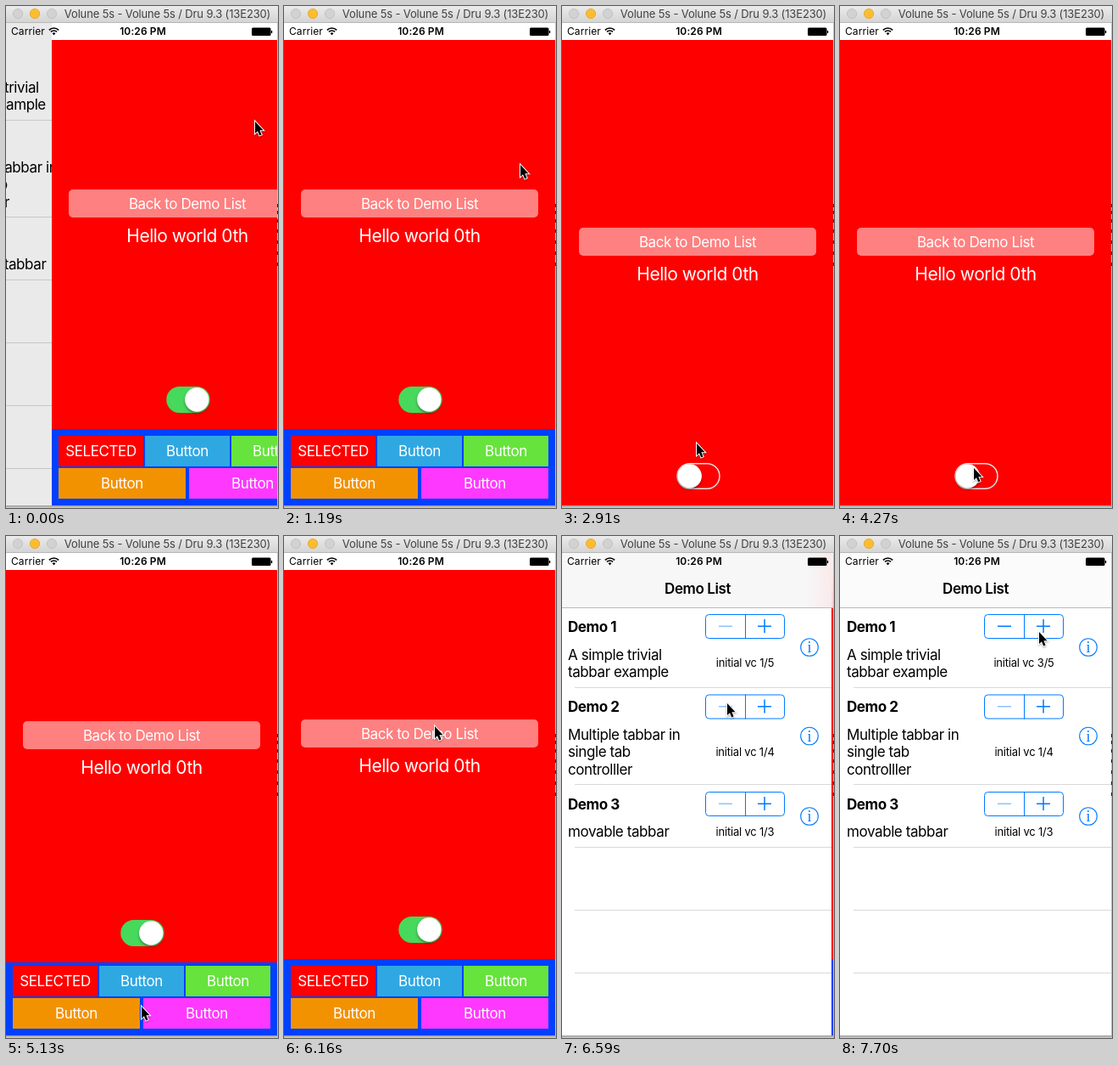
Recreate the animation shown at these times as an HTML page with a canvas. Size 321 by 591 pixels, loop 8 s.

```html
<!DOCTYPE html>
<html lang="en">
<head>
<meta charset="utf-8">
<title>Tab bar demo</title>
<style>
html, body { margin: 0; width: 100%; height: 100%; overflow: hidden; background: #fff; }
canvas { display: block; }
</style>
</head>
<body>
<canvas id="stage" width="321" height="591"></canvas>
<script>
const ctx = document.getElementById('stage').getContext('2d');
const LOOP = 8000, W = 320, BLUE = '#007aff';

const STEP = 60;
const ANCHORS = [[0, 0], [700, 1190], [2100, 2430], [3500, 4270], [4600, 5130], [5600, 6300], [6960, 7700]];

const CURSOR = [
  [1130, 293, 135], [1190, 278, 186], [1420, 205, 320], [1640, 127, 440], [1930, 162, 459],
  [2600, 162, 459], [3020, 156, 533], [3080, 157, 536], [4210, 157, 536], [4270, 157, 543],
  [4380, 159, 553], [5200, 159, 553], [5330, 176, 213], [5620, 176, 213], [5680, 177, 223],
  [6380, 177, 223], [6930, 234, 131], [7170, 234, 112]
];

const ROWS = [
  { y: 84, info: 131, stepper: 92, value: 149, lines: ['A simple trivial', 'tabbar example'] },
  { y: 178, info: 235.5, stepper: 186.5, value: 254, lines: ['Multiple tabbar in', 'single tab', 'controlller'] },
  { y: 292, info: 330, stepper: 301, value: 348.5, lines: ['movable tabbar'] }
];

const clamp = v => Math.min(1, Math.max(0, v));
const mix = (a, b, k) => a + (b - a) * k;
const easeOut = k => 1 - (1 - clamp(k)) ** 2;

// Critically damped spring used by the page transitions
function spring(ms) {
  const x = Math.max(0, ms) * 0.0175;
  return 1 - (1 + x) * Math.exp(-x);
}

// cubic-bezier(.42, 0, .58, 1)
function easeInOut(k) {
  k = clamp(k);
  let lo = 0, hi = 1;
  for (let i = 0; i < 20; i++) {
    const s = (lo + hi) / 2, r = 1 - s;
    if (1.26 * r * r * s + 1.74 * r * s * s + s ** 3 < k) lo = s; else hi = s;
  }
  return lo * lo * (3 - 2 * lo);
}

function held(t) {
  const anchor = ANCHORS.filter(a => t >= a[0]).pop()[1];
  return anchor + Math.floor((t - anchor + 2) / STEP) * STEP;
}

function rect(x, y, w, h, color) {
  ctx.fillStyle = color;
  ctx.fillRect(x, y, w, h);
}

function rounded(x, y, w, h, r) {
  ctx.beginPath();
  ctx.roundRect(x, y, w, h, r);
}

function circle(x, y, r) {
  ctx.beginPath();
  ctx.arc(x, y, r, 0, 7);
}

// y is the middle of the capital letters
function text(str, x, y, { size = 17, weight = 400, color = '#000', align = 'left', gap = -0.41, font = 'Inter, Roboto, sans-serif' } = {}) {
  ctx.font = `${weight} ${size}px ${font}`;
  ctx.letterSpacing = gap + 'px';
  ctx.textAlign = align;
  ctx.fillStyle = color;
  ctx.fillText(str, x, y + size * 0.36);
}

const white = (str, x, y, more) => text(str, x, y, { color: '#fff', align: 'center', ...more });

function windowFrame() {
  const bar = ctx.createLinearGradient(0, 0, 0, 20);
  bar.addColorStop(0, '#ebebeb');
  bar.addColorStop(1, '#d3d3d3');
  rect(0, 0, 321, 20, bar);
  rect(0, 19, 321, 1, '#b8b8b8');
  [['#d2d2d2', '#bdbdbd'], ['#fdbd2e', '#e0a025'], ['#d2d2d2', '#bdbdbd']].forEach(([fill, edge], i) => {
    circle(14 + i * 20, 9, 5.6);
    ctx.fillStyle = fill;
    ctx.fill();
    ctx.strokeStyle = edge;
    ctx.lineWidth = 0.8;
    ctx.stroke();
  });
  text('Volune 5s - Volune 5s / Dru 9.3 (13E230)', 190.5, 9.5, { size: 13, color: '#404040', align: 'center', gap: -0.15 });

  rect(W, 20, 1, 571, '#c4c4c4');
  for (const y of [233, 241, 251, 263, 276, 289, 302]) rect(W, y, 1, 4, '#222');
  const shade = ctx.createLinearGradient(0, 588, 0, 591);
  shade.addColorStop(0, '#9a9a9a');
  shade.addColorStop(1, '#d0d0d0');
  rect(0, 588, 321, 3, shade);
}

function statusBar() {
  text('Carrier', 6, 30, { size: 12, gap: 0.1 });
  text('10:26 PM', 161.5, 30, { size: 12, weight: 600, align: 'center', gap: 0.1 });
  ctx.strokeStyle = ctx.fillStyle = '#000';
  ctx.lineWidth = 1.7;
  for (const r of [5, 8]) {
    ctx.beginPath();
    ctx.arc(56.5, 34, r, -Math.PI * 0.75, -Math.PI * 0.25);
    ctx.stroke();
  }
  ctx.beginPath();
  ctx.moveTo(56.5, 34.5);
  ctx.arc(56.5, 34, 2.7, -Math.PI * 0.75, -Math.PI * 0.25);
  ctx.fill();
  rounded(290, 25.5, 22.5, 9.5, 1.5);
  ctx.fill();
  rect(312.8, 29, 1.4, 3, '#000');
}

function stepper(x, y, canLower) {
  ctx.strokeStyle = BLUE;
  ctx.lineWidth = 1;
  rounded(x + 0.5, y + 0.5, 93, 28, 4);
  ctx.stroke();
  rect(x + 47, y, 1, 29, BLUE);
  const mid = y + 14;
  ctx.globalAlpha = canLower ? 1 : 0.45;
  rect(x + 16, mid - 0.5, 16, 1.5, BLUE);
  ctx.globalAlpha = 1;
  rect(x + 62, mid - 0.5, 16, 1.5, BLUE);
  rect(x + 69.3, mid - 8, 1.5, 16, BLUE);
}

function list(x, y, dim, count) {
  ctx.save();
  ctx.translate(x, y);
  rect(0, -60, W + 96, 700, '#fff');
  ROWS.forEach((row, i) => {
    text(`Demo ${i + 1}`, 8, row.y + (i < 2 ? 22.5 : 24), { weight: 700 });
    row.lines.forEach((line, n) => text(line, 8, row.y + 56 + n * 20.3));
    const value = i ? 1 : count;
    stepper(170, row.stepper, value > 1);
    text(`initial vc ${value}/${5 - i}`, 217, row.value, { size: 13, align: 'center', gap: -0.2 });
    circle(293, row.info, 10.3);
    ctx.strokeStyle = BLUE;
    ctx.lineWidth = 1.1;
    ctx.stroke();
    text('i', 293, row.info - 0.3, { size: 18, color: BLUE, align: 'center', gap: 0, font: '"Liberation Serif", serif' });
  });
  for (const line of [178, 292, 366, 440, 514, 588]) rect(16, line, W - 16, 1, '#d9d9dc');
  ctx.restore();
  rect(0, 20, W, 568, `rgba(0,0,0,${dim})`);
}

function toggle(y, off, ms) {
  const knob = easeInOut(ms / 210), ring = easeOut(ms / 350);
  const right = off ? 1 - knob : knob;
  const fill = off ? 1 - ring : ring;
  const line = 1.5 + 14 * fill;
  ctx.strokeStyle = `rgb(${mix(232, 70, fill)},${mix(226, 217, fill)},${mix(226, 92, fill)})`;
  ctx.lineWidth = line;
  rounded(135.3 + line / 2, y + line / 2, 51.4 - line, 31 - line, Math.max(0, 15.5 - line / 2));
  ctx.stroke();
  ctx.save();
  ctx.shadowColor = 'rgba(0,0,0,.35)';
  ctx.shadowBlur = 3;
  ctx.shadowOffsetY = 2;
  ctx.fillStyle = '#fff';
  circle(mix(150.7, 171.3, right), y + 15.5, 14.2);
  ctx.fill();
  ctx.restore();
}

function tabPage(x, grow, off, toggleMs) {
  ctx.save();
  ctx.translate(x, 0);
  rect(0, 20, W, 20, '#fff');
  rect(0, 40, W, 548, '#0040ff');
  [['SELECTED', '#f00'], ['Button', '#2fa8e2'], ['Button', '#66e33c']].forEach(([label, color], i) => {
    rect(8 + i * 102, 506, 100, 36, color);
    white(label, 58 + i * 102, 524);
  });
  ['#f39200', '#ff38ff'].forEach((color, i) => {
    rect(8 + i * 154, 544, 150, 36, color);
    white('Button', 83 + i * 154, 562);
  });

  // The red content grows down over the fixed tab bar.
  const extra = Math.round(90 * grow), half = extra / 2;
  rect(0, 40, W, 458 + extra, '#f00');
  ctx.fillStyle = 'rgba(255,255,255,.5)';
  rounded(20, 216 + half, 280, 33, 5);
  ctx.fill();
  white('Back to Demo List', 160, 232.5 + half);
  white('Hello world 0th', 160, 270 + half, { size: 21, gap: -0.5 });
  toggle(448 + extra, off, toggleMs);
  ctx.restore();
}

function navBar(pageX) {
  rect(0, 20, W, 64, pageX < W ? '#f7f7f7' : '#fbfbfb');
  if (pageX < W) {
    const tint = ctx.createLinearGradient(0, 20, 0, 84);
    tint.addColorStop(0, 'rgba(255,215,215,.1)');
    tint.addColorStop(1, 'rgba(255,205,205,.85)');
    rect(pageX, 20, W - pageX, 64, tint);
    const soft = ctx.createLinearGradient(pageX - 30, 0, pageX, 0);
    soft.addColorStop(0, 'rgba(255,215,215,0)');
    soft.addColorStop(1, 'rgba(255,215,215,.4)');
    rect(pageX - 30, 20, 30, 64, soft);
  }
  rect(0, 84, W, 1, '#b9b9bb');
  text('Demo List', 160, 62, { weight: 600, align: 'center' });
}

function cursor(t) {
  let i = CURSOR.findIndex(k => k[0] > t);
  if (i < 0) i = CURSOR.length;
  const a = CURSOR[Math.max(0, i - 1)], b = CURSOR[Math.min(i, CURSOR.length - 1)];
  const k = b[0] > a[0] ? (t - a[0]) / (b[0] - a[0]) : 0;
  ctx.save();
  ctx.translate(Math.round(mix(a[1], b[1], k)), Math.round(mix(a[2], b[2], k)));
  ctx.shadowColor = 'rgba(0,0,0,.35)';
  ctx.shadowBlur = 2;
  ctx.shadowOffsetY = 1;
  const arrow = new Path2D('M1 1V15L4 12.2L6.2 17.4L8.6 16.4L6.4 11.3H10.6Z');
  ctx.strokeStyle = '#fff';
  ctx.lineWidth = 2;
  ctx.stroke(arrow);
  ctx.shadowColor = 'transparent';
  ctx.fillStyle = '#000';
  ctx.fill(arrow);
  ctx.restore();
}

function draw(now) {
  const t = held(now);
  const popping = t >= 6155;
  const shown = popping ? 1 - spring(t - 6126) : spring(t + 184);
  const pageX = Math.round(W * (1 - shown));
  const off = t >= 2210 && t < 4700;
  const changed = t < 2210 ? -1000 : off ? 2210 : 4700;
  const phase = easeInOut((t - changed) / 500);
  const count = now < 7530 ? 1 : now < 7700 ? 2 : 3;

  ctx.clearRect(0, 0, 321, 591);
  ctx.save();
  ctx.beginPath();
  ctx.rect(0, 20, W, 568);
  ctx.clip();
  list(Math.round(-96 * shown), popping ? 0 : -44, 0.1 * shown, count);
  tabPage(pageX, off ? phase : 1 - phase, off, t - changed);
  if (popping) navBar(pageX);
  statusBar();
  ctx.restore();
  windowFrame();
  cursor(t);
}

const start = performance.now();
function tick() {
  draw((performance.now() - start) % LOOP);
  requestAnimationFrame(tick);
}
tick();
</script>
</body>
</html>
```
